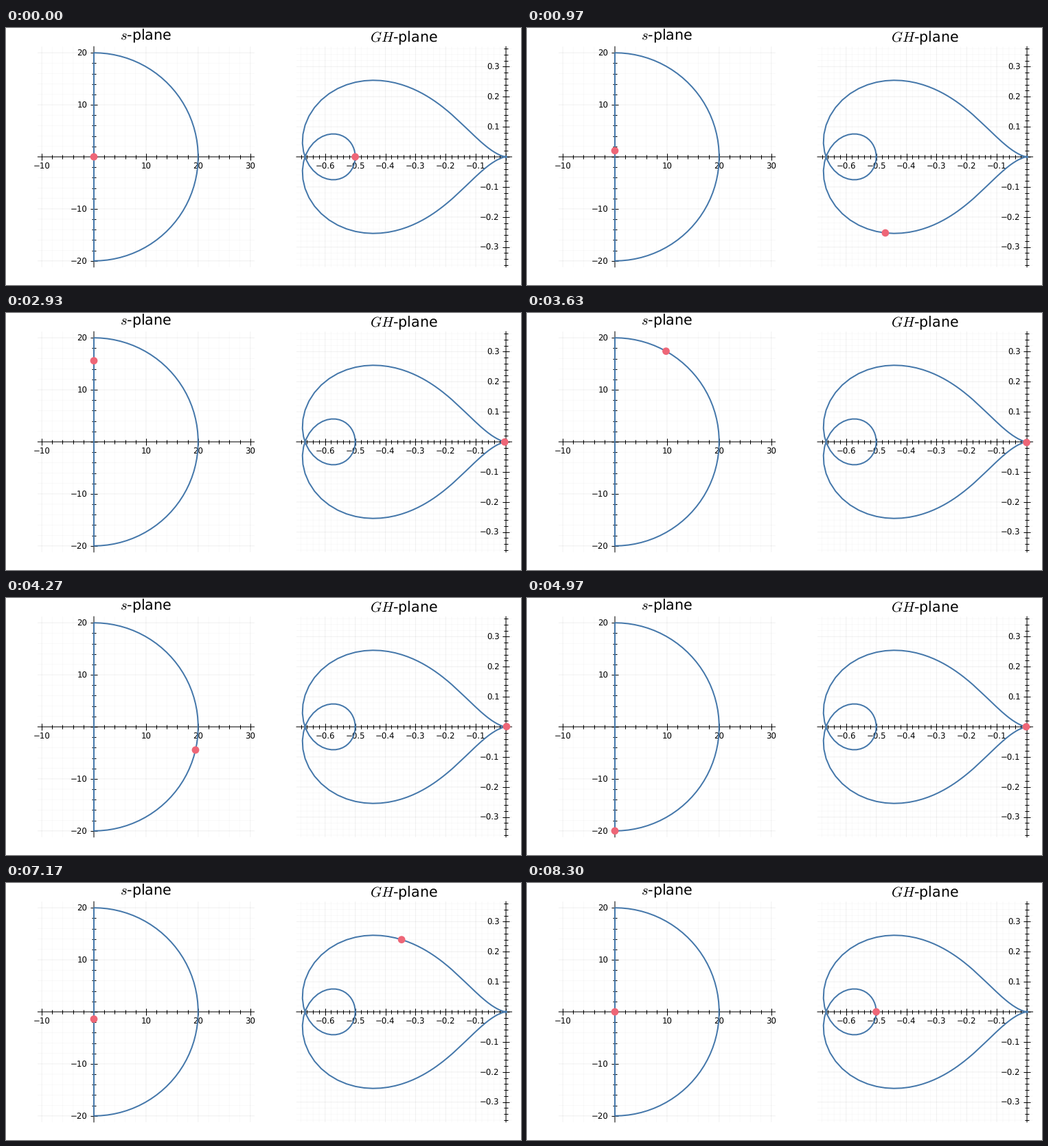
These frames come from a looping animation (750x375 px, 8330 ms). A matplotlib script:

```python
import numpy as np
import matplotlib.pyplot as plt
from matplotlib.animation import FuncAnimation
from matplotlib.patches import Circle
from matplotlib.ticker import FuncFormatter, MultipleLocator

W, H, DPI = 750, 375, 100
PX = 72 / DPI
LOOP_MS = 8330
DOT_RADIUS = 5.4
BLUE, RED = "#4477AA", "#EE6677"

plt.rcParams.update({
    "font.family": "DejaVu Sans",
    "mathtext.fontset": "cm",
    "text.hinting": "none",
    "path.snap": False,
})


def contour(radius=20, knee=2, n=50):
    """Nyquist contour: up the imaginary axis, around the arc, back up to 0."""
    low = 1j * np.linspace(0, knee, n)
    high = 1j * np.linspace(knee, radius, n)
    arc = radius * np.exp(1j * np.linspace(np.pi / 2, -np.pi / 2, n))
    back = -np.concatenate([low, high])[::-1]
    return np.concatenate([low, high, arc, back])


def loop_gain(s):
    return (s - 1) / ((s + 2) * (s**2 - s + 1))


def label(v, _):
    return "" if abs(v) < 1e-9 else f"{v:g}".replace("-", "\u2212")


def plane(zero, scale, left, right, step, title, baseline):
    """Axes through the origin; all positions are stage pixels."""
    x0, y0 = zero
    top, bottom = 27.1, 348.9
    ax = fig.add_axes([left / W, 1 - bottom / H,
                       (right - left) / W, (bottom - top) / H])
    ax.set_xlim((left - x0) / scale, (right - x0) / scale)
    ax.set_ylim((y0 - bottom) / scale, (y0 - top) / scale)
    ax.patch.set_visible(False)
    ax.set_axisbelow(True)
    for side in ("top", "right"):
        ax.spines[side].set_visible(False)
    for side in ("left", "bottom"):
        ax.spines[side].set_position("zero")
        ax.spines[side].set_linewidth(1 * PX)
    for axis in (ax.xaxis, ax.yaxis):
        axis.set_major_locator(MultipleLocator(step))
        axis.set_minor_locator(MultipleLocator(step / 5))
        axis.set_major_formatter(FuncFormatter(label))
    ax.tick_params(which="both", direction="inout", width=1 * PX)
    ax.tick_params(which="major", length=10 * PX, labelsize=11.8 * PX)
    ax.tick_params(which="minor", length=6 * PX)
    ax.tick_params(axis="x", pad=3.5 * PX)
    ax.tick_params(axis="y", pad=4.6 * PX)
    ax.grid(which="major", color="black", alpha=0.06, lw=1 * PX)
    ax.grid(which="minor", color="black", alpha=0.025, lw=1 * PX)
    fig.text((left + right) / 2 / W, 1 - baseline / H, title,
             ha="center", va="baseline", fontsize=20.6 * PX)
    return ax, scale


def trace(ax, scale, z):
    ax.plot(z.real, z.imag, color=BLUE, lw=2 * PX, zorder=3)
    return ax.add_patch(Circle((0, 0), DOT_RADIUS / scale, fc=RED, lw=0,
                               zorder=4, clip_on=False))


fig = plt.figure(figsize=(W / DPI, H / DPI), dpi=DPI, facecolor="white")
s_plane = plane((128, 188), 7.59, 46.4, 361.6, 10, "$s$-plane", 17.7)
g_plane = plane((728.1, 188), 439, 423, 736.6, 0.1, "$GH$-plane", 20.5)

s = contour()
gh = loop_gain(s)
dots = [(trace(*s_plane, s), s), (trace(*g_plane, gh), gh)]


def draw(i):
    for dot, z in dots:
        dot.set_center((z[i].real, z[i].imag))
    return [dot for dot, _ in dots]


anim = FuncAnimation(fig, draw, frames=len(s), interval=LOOP_MS / len(s),
                     repeat=True, repeat_delay=0, blit=False)
plt.show()
```
